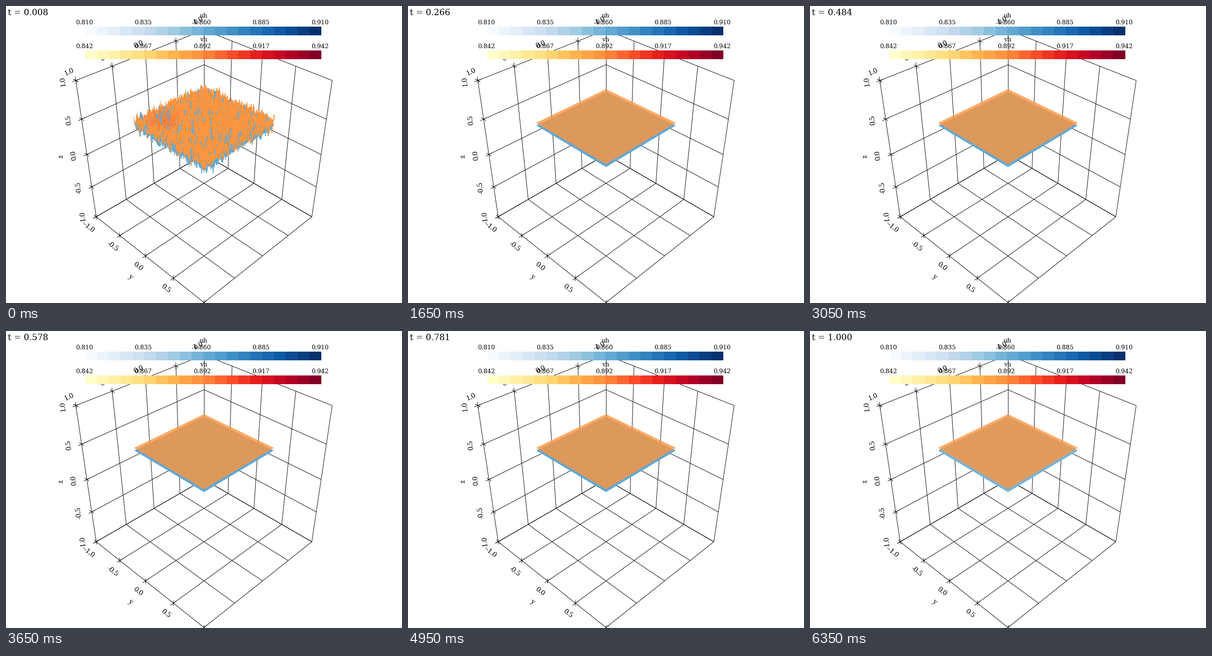
A matplotlib script that plays this animation: 864 by 648 pixels, repeating every 6400 ms.

```python
import matplotlib.pyplot as plt
import numpy as np
from matplotlib.animation import FuncAnimation
from matplotlib.collections import LineCollection, PolyCollection
from matplotlib.patches import Polygon, Rectangle

W, H, FRAMES = 864, 648, 128
BLUES = plt.get_cmap("Blues", 20)
REDS = plt.get_cmap("YlOrRd", 20)
U_MEAN, V_MEAN = 0.860, 0.892

fig = plt.figure(figsize=(W / 100, H / 100), dpi=100, facecolor="white")
ax = fig.add_axes([0, 0, 1, 1])
ax.set_xlim(0, W)
ax.set_ylim(H, 0)
ax.axis("off")


def project(pts):
    """Isometric view direction, 30 degree lens, the box just inside the view."""
    x, y, z = np.moveaxis(np.asarray(pts, float), -1, 0)
    half = np.radians(15)
    depth = np.sqrt(3) / np.sin(half) - (x + y + z) / np.sqrt(3)
    scale = H / 2 / np.tan(half) / depth
    return np.stack([W / 2 + scale * (y - x) / np.sqrt(2),
                     H / 2 - scale * (2 * z - x - y) / np.sqrt(6)], axis=-1)


def label(pos, s, px, rot=0, font="DejaVu Serif", z=8, **kw):
    kw = {"ha": "center", "va": "center", **kw}
    return ax.text(*pos, s, fontsize=px * 0.72, rotation=rot, family=font,
                   rotation_mode="default", zorder=z, **kw)


# --- Box, grid and ticks -------------------------------------------------
STEPS = np.linspace(-1, 1, 5)
lines = []
for k in STEPS:
    for a in range(3):
        for b in range(3):
            if a != b:
                # a runs along the line, b is fixed at k, the third axis is a wall
                ends = np.full((2, 3), -1.0)
                ends[:, a] = -1, 1
                ends[:, b] = k
                lines.append(project(ends))


def draw_axis(name, axis, corner, offset, rot):
    for k in STEPS:
        spot = np.array(corner, float)
        spot[axis] = k
        for other in {0, 1, 2} - {axis}:
            arm = 0.045 * np.eye(3)[other]
            lines.append(project([spot - arm, spot + arm]))
        pos = project(spot) + offset
        if pos[1] < H:
            label(pos, f"{k:.1f}", 17, rot, "Liberation Serif", 2)
        if name and k == 0:
            label(pos + offset, name, 16, rot, "Liberation Serif", 2)


draw_axis("", 0, (0, -1, 1), np.array([-15, -19]), 24)
draw_axis("y", 1, (1, 0, -1), np.array([-16, 23]), -38)
draw_axis("z", 2, (1, -1, 0), np.array([-28, 2]), 97)
ax.add_collection(LineCollection(lines, colors="black", linewidths=0.72, zorder=1))


# --- Colour bars ---------------------------------------------------------
def color_bar(name, cmap, y, low):
    x0, step = 173, 514.6 / 20
    for i in range(20):
        ax.add_patch(Rectangle((x0 + i * step, y), step, 19, color=cmap(i),
                               lw=0, zorder=6, antialiased=False))
    label((431, y - 23.5), name, 13.3)
    for k in range(5):
        label((171 + 128.4 * k, y - 5), f"{low + 0.025 * k:.3f}", 13.3, va="baseline")


color_bar("uh", BLUES, 45, 0.810)
color_bar("vh", REDS, 97, 0.842)
clock = label((3.5, 20), "", 18.6, ha="left", va="baseline")


# --- Flat sheets over the unit square ------------------------------------
def on_sheet(x, y, level):
    return project(np.stack([x, y, np.full_like(x, level)], axis=-1))


def add_poly(level, color, z, alpha=1):
    pts = on_sheet(np.array([0.0, 1, 1, 0]), np.array([0.0, 0, 1, 1]), level)
    return ax.add_patch(Polygon(pts, closed=True, fc=color, lw=0, alpha=alpha, zorder=z))


u_flat = add_poly(U_MEAN, BLUES(10), 3)
u_low = add_poly(U_MEAN, BLUES(9), 3.1)
v_flat = add_poly(V_MEAN, REDS(9), 3.2, 0.8)
v_high = add_poly(V_MEAN, REDS(10), 3.3, 0.8)
BUMP, BUMP_R = (0.79, 0.21), 0.15


# --- Noisy start ---------------------------------------------------------
def rough_sheet(level, rng, n=100, spread=0.04):
    """Triangles in space of a sheet with random heights."""
    g = np.linspace(0, 1, n + 1)
    x, y = np.meshgrid(g, g, indexing="ij")
    pts = np.dstack([x, y, rng.normal(level, spread, x.shape)])
    a, b, c, d = pts[:-1, :-1], pts[1:, :-1], pts[1:, 1:], pts[:-1, 1:]
    return np.concatenate([np.stack(t, 2).reshape(-1, 3, 3)
                           for t in ((a, b, c), (a, c, d))])


rng = np.random.default_rng(4)
u_tri, v_tri = rough_sheet(U_MEAN, rng), rough_sheet(V_MEAN, rng)
reach = np.hypot(*(v_tri.mean(axis=1)[:, :2] - BUMP).T)
near = reach < BUMP_R * rng.normal(1, 0.25, len(reach))
colors = np.concatenate([
    np.tile(BLUES(10), (len(u_tri), 1)),
    np.where(near[:, None], REDS(10), REDS(9)),
])
tri = np.concatenate([u_tri, v_tri])
order = np.argsort(tri.mean(axis=1).sum(axis=1))
rough = PolyCollection(project(tri[order]), facecolors=colors[order], edgecolors="none",
                       linewidths=0, antialiaseds=False, zorder=4)
ax.add_collection(rough)


# --- Motion --------------------------------------------------------------
def low_size(i):
    """Size of the corner region where uh is in the lower band."""
    if i < 32:
        return np.sqrt((32 - i) / 20)
    return 1.3 * (max(i - 104, 0) / 14) ** 1.8


def low_region(s, n=3.7):
    t = np.linspace(0, np.pi / 2, 120)
    y = np.clip(1 - 0.31 * s * np.cos(t) ** (2 / n), 0, 1)
    x = np.clip(0.77 * s * np.sin(t) ** (2 / n), 0, 1)
    return on_sheet(np.append(x, 0), np.append(y, 1), U_MEAN)


def bump_region(r):
    t = np.linspace(0, 2 * np.pi, 60)
    return on_sheet(BUMP[0] + r * np.cos(t), BUMP[1] + r * np.sin(t), V_MEAN)


def update(i):
    clock.set_text(f"t = {(i + 1) / FRAMES:.3f}")
    noisy = i == 0
    rough.set_visible(noisy)
    u_flat.set_visible(not noisy)
    v_flat.set_visible(not noisy)

    size = low_size(i)
    u_low.set_visible(not noisy and size > 0)
    u_low.set_xy(low_region(size))

    v_high.set_visible(0 < i < 4)
    v_high.set_xy(bump_region(BUMP_R * np.sqrt(max(1 - i / 4, 0))))
    return clock, rough, u_flat, u_low, v_flat, v_high


anim = FuncAnimation(fig, update, frames=FRAMES, interval=50, repeat=True,
                     repeat_delay=0, blit=False)
plt.show()
```
